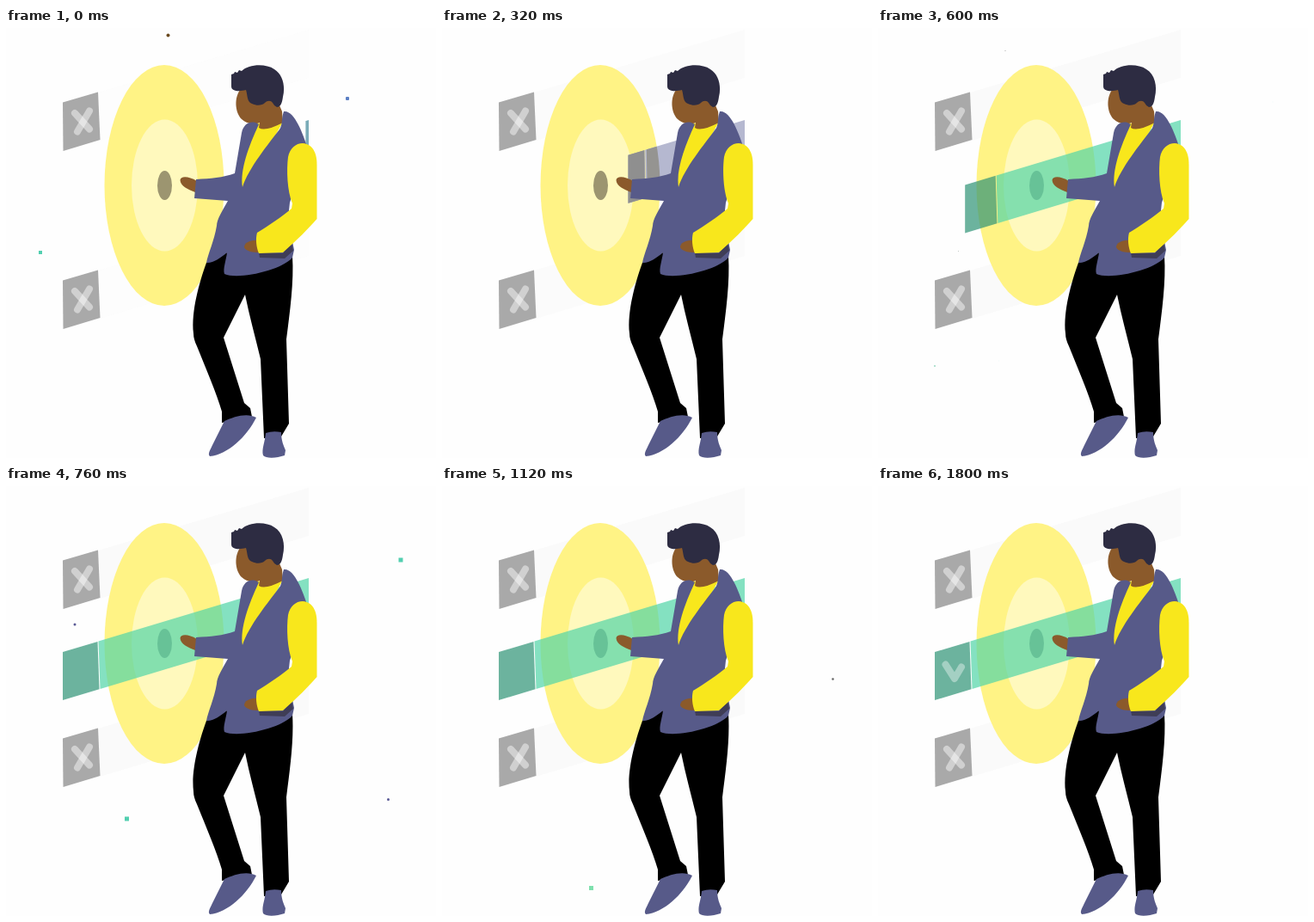
Animation, 500 px wide and 500 px high, one loop 1.82 s. Source, as an HTML page:

```html
<!DOCTYPE html>
<html lang="en">
<head>
<meta charset="utf-8">
<title>Selecting an option</title>
<style>
html, body { margin: 0; height: 100%; overflow: hidden; background: #fefefe; }
svg { display: block; width: 100vw; height: 100vh; }
.skin { fill: #8b5a2b; }
.cloth { fill: #575a89; }
.yellow { fill: #f8e71c; }
.mark { fill: none; stroke: #fff; stroke-width: 8; stroke-linecap: round; stroke-linejoin: round; }
</style>
</head>
<body>
<svg viewBox="0 0 500 500">
  <defs>
    <clipPath id="disc"><ellipse cx="184" cy="183" rx="69.5" ry="140"/></clipPath>
    <g id="option">
      <path fill="#a9a9a9" d="M66 86.500L107 74.500L109.500 130L66.500 143Z"/>
      <g class="mark" stroke-opacity=".45">
        <path d="M80 99L97 117.500"/><path d="M97 96.500L83 120.500"/>
      </g>
    </g>
    <path id="row" d="M107 75L352 2V58L109 131Z" fill="#fafafa"/>
  </defs>

  <g id="rows"><use href="#row"/><use href="#row" y="207"/></g>
  <use href="#option"/><use href="#option" y="207"/>

  <ellipse cx="184" cy="183" rx="69.500" ry="140" fill="#fff385"/>
  <ellipse cx="184.500" cy="183" rx="38.500" ry="76.500" fill="#fff9bd"/>
  <ellipse cx="184.500" cy="183" rx="8.500" ry="17" fill="#9c9570"/>

  <g class="strip">
    <path id="bar" d="M-244.500 0H0V56H-242.500Z"/>
    <path id="box" d="M-286 0H-245.500L-243.500 56H-286Z"/>
  </g>
  <g id="shade" clip-path="url(#disc)">
    <g class="strip">
      <path fill="#959491" d="M-241 0H0V56H-239Z"/>
      <path fill="#8f8f8f" d="M-286 0H-247L-245 56H-286Z"/>
    </g>
  </g>
  <path id="check" class="mark" d="M78.500 207.500L89 224L97 210.500"/>

  <path d="M233 273C225 295 215 330 218 355Q218 362 222 370C232 395 245 425 251 446V459L286 452L284 442L277 436L253 360L278 310C283 335 290 360 296 385L300 477L320 475L329 460L326 362C330 330 335 295 333 265L257 261Z"/>
  <path class="cloth" d="M254 457C265 452 280 447 291 453C280 475 258 496 237 498C234 495 238 490 240 485Z"/>
  <path class="cloth" d="M302 471Q310 468 320 470C320 480 323 486 325 491L324 497C315 500 303 501 299 497C297 490 301 482 302 471Z"/>

  <path class="skin" d="M222 178C212 172 203 172 202.500 177C203 184 212 188 220 191Z"/>
  <path class="yellow" d="M291 111L322 109L280 185L274 186L272 166Z"/>
  <path class="skin" d="M273 71C265 80 266 98 274 106C279 111 288 113 295 110L294 116Q301 121 322 110L321 97L318 90L300 75Z"/>
  <path class="cloth" d="M290 110C283 108 276 112 274 122L266 169C252 174 238 175 221 176L219 198L258 201C252 212 245 222 245 230C242 248 235 262 233 273C240 274 250 267 257 261C256 270 252 280 254 286C270 293 320 282 333 267L335 258L333 248L329 212L330 203L351 140C345 122 335 95 323 97C320 105 322 112 318 118C305 135 282 163 275 185C272 165 282 138 294 112Z"/>
  <path fill="#3f3d56" d="M294 261L322 262L332 250L334 259L324 268L295 267Z"/>
  <path class="skin" d="M293 247C284 246 277 250 277 255C279 260 288 261 294 261Z"/>
  <path class="yellow" d="M345 134C358 135 362 148 361.500 160V222C350 235 340 245 322 261L294 262C291 255 290 245 292 238C305 230 320 220 332 210L333 204C327 190 326 165 328 150C330 140 337 134 345 134Z"/>
  <path fill="#2d2c42" d="M262 54L265 53L266 51L269 52L271 49L274 50C282 42 302 41 312 48C322 54 325 68 322 80C321 88 319 92 315 92Q312 91 310 87C308 84 304 84 301 87C298 90 292 91 286 88C280 86 281 78 279 72C272 74 262 74 262 68Z"/>
  <g id="dots"></g>
</svg>
<script>
const LOOP = 1820, STEP = 20, POP = 170;
const $ = id => document.getElementById(id);
const clamp = v => Math.max(0, Math.min(1, v));
const strips = document.querySelectorAll('.strip');

// x, y, size, colour, peak time, corner radius
const dots = [
  [188.5, 8.5, 4, '#6b4a20', 0, 2], [397, 82, 4, '#5b7fc4', 0, 1], [40, 261, 4, '#52cfb0', 0, 0],
  [148, 26.5, 2, '#555', 500, 1], [93.5, 259.5, 2.5, '#aab5ad', 500, 1], [66, 393, 4, '#8fd3bb', 500, 0],
  [459, 86, 5, '#52cfb0', 760, 0], [80, 161, 3, '#5a5a95', 760, 1.5],
  [140.5, 387, 5, '#52cfb0', 760, 0], [444.5, 364.5, 3, '#5a5a95', 760, 1.5],
  [454.5, 224.5, 2.5, '#666', 1120, 1], [173.500, 467.5, 5, '#7fe0ae', 1120, 0]
].map(([x, y, size, fill, peak, rx]) => {
  const el = document.createElementNS('http://www.w3.org/2000/svg', 'rect');
  const attrs = { x: -size / 2, y: -size / 2, width: size, height: size, rx, fill };
  for (const key in attrs) el.setAttribute(key, attrs[key]);
  $('dots').append(el);
  return { el, x, y, peak };
});

function draw(t) {
  // The strip unrolls to the left from its pinned right edge
  const s = clamp(.013 + .00144 * t);
  for (const strip of strips)
    strip.setAttribute('transform', `matrix(${s} ${-.301 * s} 0 1 352 107)`);

  const [bar, box] = t < 60 ? ['#7aacb8', '#7aacb8']
    : t < 400 ? ['#b5b8d0', '#a0a2b0']
    : ['rgba(82,214,169,.7)', 'rgba(47,149,119,.7)'];
  $('bar').setAttribute('fill', bar);
  $('box').setAttribute('fill', box);
  $('shade').style.display = t >= 60 && t < 400 ? '' : 'none';
  $('rows').setAttribute('opacity', .3 + .7 * clamp(t / 450));

  const p = clamp((t - 1140) / 560), k = .73 + .27 * p;
  $('check').setAttribute('stroke-opacity', .38 * p);
  $('check').setAttribute('transform', `translate(88 216) scale(${k}) translate(-88 -216)`);

  for (const { el, x, y, peak } of dots) {
    const size = clamp(1 - Math.abs(t - peak) / POP);
    el.setAttribute('transform', `translate(${x} ${y}) scale(${size})`);
  }
}

const start = performance.now();
function tick() {
  const t = (performance.now() - start) % LOOP;
  draw(Math.floor(t / STEP) * STEP);
  requestAnimationFrame(tick);
}
tick();
</script>
</body>
</html>
```
